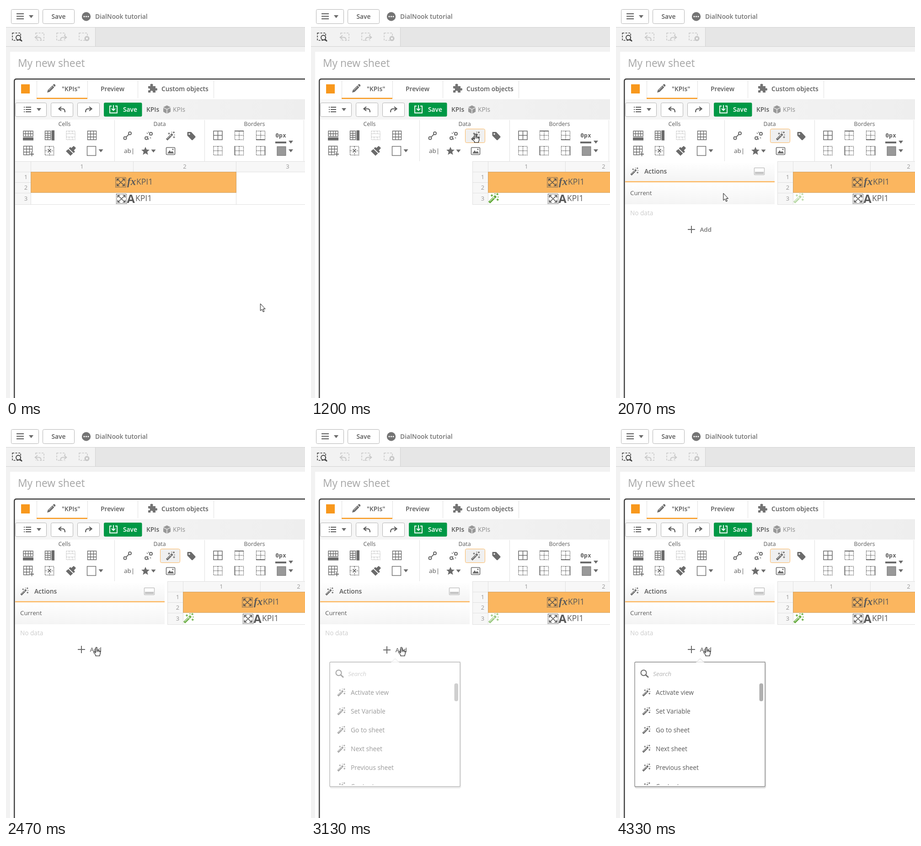
An HTML page for the animation above (4390 ms loop, 654 by 856 pixels).

```html
<!DOCTYPE html>
<html lang="en">
<head>
<meta charset="utf-8">
<title>Sheet editor</title>
<style>
html, body { margin: 0; width: 100%; height: 100%; overflow: hidden; background: #fff; }
svg { display: block; width: 654px; height: 856px; color: #6b6b6b; font: 13.8px "Open Sans", "Noto Sans", sans-serif; }
text { fill: #595959; }
.b { font-weight: 600; }
.mid { text-anchor: middle; }
.dim { fill: #8c8c8c; }
.num text { fill: #959595; font-size: 13px; text-anchor: middle; }
.btn { fill: #fff; stroke: #b3b3b3; }
.line { fill: none; stroke: currentColor; }
.rule { fill: none; stroke: #e0e0e0; }
.dots { fill: none; stroke: currentColor; stroke-dasharray: 2 1.4; }
.pale { color: #c9c9c9; }

.t { animation: 4390ms infinite both; }
.move { animation-name: move; }
.arrow { animation-name: arrow; animation-timing-function: step-end; }
.hand { animation-name: hand; animation-timing-function: step-end; }
.before { animation-name: before; animation-timing-function: step-end; }
.after { animation-name: after; animation-timing-function: step-end; }
.panel { animation-name: panel; animation-timing-function: linear; }
.add { animation-name: add; animation-timing-function: step-end; }
.menu { animation-name: menu; animation-timing-function: linear; }
.pulse { animation-name: pulse; animation-timing-function: ease-in-out; color: #55a32a; }

@keyframes move {
  0% { transform: translate(556.5px, 650px); animation-timing-function: steps(8, end); }
  12.03% { transform: translate(381px, 301px); animation-timing-function: step-end; }
  13.62% { transform: translate(359px, 279.5px); animation-timing-function: step-end; }
  37.9% { transform: translate(359px, 279.5px); animation-timing-function: steps(8, end); }
  50.05% { transform: translate(193.5px, 452px); animation-timing-function: step-end; }
  51.59%, 100% { transform: translate(197.5px, 483.5px); }
}
@keyframes arrow {
  0%, 40.89% { opacity: 1; }
  13.62%, 51.59%, 100% { opacity: 0; }
}
@keyframes hand {
  0%, 40.89% { opacity: 0; }
  13.62%, 51.59%, 100% { opacity: 1; }
}
@keyframes before { 0% { opacity: 1; } 27.29%, 100% { opacity: 0; } }
@keyframes after { 0% { opacity: 0; } 27.29%, 100% { opacity: 1; } }
@keyframes panel { 0%, 30.25% { opacity: 0; } 34.85%, 100% { opacity: 1; } }
@keyframes add {
  0%, 74.37%, 100% { transform: none; }
  66.74% { transform: translate(1px, 1px); }
}
@keyframes menu { 0%, 66.74% { opacity: 0; } 74.37%, 100% { opacity: 1; } }
@keyframes pulse {
  0%, 27.33%, 61.5%, 95.67% { opacity: 1; }
  44.42%, 78.59% { opacity: .4; }
  100% { opacity: .93; }
}
</style>
</head>
<body>
<svg viewBox="0 0 654 856">
<defs>
  <linearGradient id="shade" x2="0" y2="1"><stop offset="0" stop-color="#fff"/><stop offset="1" stop-color="#f4f4f4"/></linearGradient>
  <linearGradient id="bar" x2="1" y2="0"><stop offset="0" stop-color="#f7f7f7"/><stop offset="1" stop-color="#eee"/></linearGradient>
  <clipPath id="list"><path d="M42 560H312V784H42Z"/></clipPath>
  <path id="down" d="M-5-3H5L0 3.5Z" fill="currentColor"/>
  <g id="wand">
    <path d="M-8 8L4.5-4.5" stroke="currentColor" stroke-width="4.6"/>
    <path d="M-.6-2.4L2.4.6M1.8-2.8L-7 6" stroke="#fff" stroke-width="1"/>
    <path d="M-5-5.5h4M-3-7.5v4M5.5-8h4M7.500-10v4M6 2.500h4M8 .5v4M2-8.500h2M8-2.500h2" stroke="currentColor" stroke-width="1.5"/>
  </g>
  <g id="table"><path class="line" stroke-width="1.4" d="M-9.500-9.500H9.500V9.500H-9.500ZM-9.500-3H9.500M-9.500 3.500H9.500M-3-9.500V9.500M3.500-9.500V9.500"/></g>
  <g id="dotted"><path class="dots" stroke-width="1.4" d="M-9.500-9.500H9.500V9.500H-9.500ZM-9.500 0H9.500M0-9.500V9.500"/></g>
  <path id="dashbox" class="line" stroke-width="1.6" stroke-dasharray="4 2.500" d="M-10-8H8V8H-10Z"/>
  <path id="back" fill="none" stroke="currentColor" d="M-1-6L-6.500-1.500-1 3M-6-1.500H2Q7-1.500 7 6"/>
  <g id="expand">
    <path class="line" stroke-dasharray="1.5 1.3" stroke-width="1.5" d="M-11-10.500H11V10.500H-11Z"/>
    <path class="line" stroke-width="1.6" d="M-7.500-7L7.500 7M7.500-7L-7.500 7M-8-2.500V-7.500H-3M8-2.500V-7.500H3M-8 2.500V7.500H-3M8 2.500V7.500H3"/>
  </g>
  <g id="cells" color="#4d4d4d">
    <use href="#expand" x="251" y="385"/>
    <text x="265" y="391" font-size="23" font-family="Liberation Serif, serif" font-weight="700" font-style="italic">fx</text>
    <text x="285" y="390" font-size="17.500">KPI1</text>
    <use href="#expand" x="252.500" y="421"/>
    <text x="264.500" y="430" font-size="25" font-weight="700">A</text>
    <text x="283" y="426" font-size="17.500">KPI1</text>
  </g>
</defs>

<!-- app header -->
<path fill="#f2f2f2" d="M0 46H654V856H0Z"/>
<path fill="#e6e6e6" d="M196 47H654V88H196Z"/>
<path fill="#fff" d="M0 0H654V46H0ZM9 100H654V856H9Z"/>
<path fill="none" stroke="#d2d2d2" d="M0 46.500H654M0 88.500H654M195.500 47V88"/>
<rect class="btn" x="11.500" y="7.500" width="60" height="31" rx="3"/>
<path stroke="#595959" stroke-width="2" d="M23 17H39M23 22.500H39M23 28H39"/>
<use href="#down" x="55" y="23"/>
<rect class="btn" x="80.500" y="7.500" width="69" height="31" rx="3"/>
<text class="b mid" x="115" y="28">Save</text>
<circle cx="175.500" cy="23" r="9.700" fill="#737373"/>
<g fill="#fff"><circle cx="171" cy="23" r="1.600"/><circle cx="175.500" cy="23" r="1.600"/><circle cx="180" cy="23" r="1.600"/></g>
<text class="b" x="195" y="28" style="fill:#737373">DialNook tutorial</text>
<g color="#404040">
  <use href="#dashbox" x="24" y="67"/>
  <circle cx="27" cy="69" r="5" fill="#f2f2f2" stroke="#404040" stroke-width="1.800"/>
  <path stroke="#404040" stroke-width="2.500" d="M30.500 72.500L35 77"/>
</g>
<g class="pale">
  <use href="#dashbox" x="75" y="67"/><use href="#dashbox" x="121" y="67"/><use href="#dashbox" x="170" y="67"/>
  <path fill="#f2f2f2" d="M62 64h13v10H62ZM122 64h12v11h-12Z"/>
  <use href="#back" x="70" y="70" stroke-width="1.800"/>
  <use href="#back" transform="translate(126 70) scale(-1 1)" stroke-width="1.800"/>
  <circle cx="177" cy="71" r="5.500" fill="#c6c6c6"/>
  <path stroke="#fff" stroke-width="1.400" d="M175 69l4 4M179 69l-4 4"/>
</g>
<text x="26" y="133" font-size="22.800" style="fill:#a6a6a6">My new sheet</text>

<!-- tabs -->
<path fill="#fff" stroke="#404040" stroke-width="2.500" d="M18.200 860V164Q18.200 159.500 23 159.500H660V860Z"/>
<path class="rule" d="M67.500 162V201M178.500 162V201M288.500 162V201M454.500 162V201"/>
<path fill="#f8981d" d="M33 171H52V191H33ZM67 200.500H178V203H67Z"/>
<g transform="translate(98.500 180)" fill="#6b6b6b">
  <path d="M-8.500 9L-7 3.500 3-6.500 7-2.500-3 7.500ZM4-7.500L6-9.500Q7-10 8-9L9.500-7.500Q10-6.500 9.500-5.500L8-3.500Z"/>
  <path d="M-5 4L3-4" stroke="#fff"/>
</g>
<text class="b" x="122" y="185.500">"KPIs"</text>
<text class="b mid" x="233" y="185.500">Preview</text>
<path fill="#737373" d="M311 175h5q-2-5 2.500-5t2.500 5h6v5q4-2 4 2t-4 2v5h-6q1-4-2.500-4t-2 4h-5.500v-5q4 1 4-2t-4-2Z"/>
<text class="b" x="340" y="185.500">Custom objects</text>

<!-- action bar -->
<path fill="url(#bar)" d="M20 203.500H654V248H20Z"/>
<rect class="btn" x="20.500" y="211.500" width="68" height="30" rx="3"/>
<rect class="btn" x="98.500" y="211.500" width="48" height="30" rx="3"/>
<rect class="btn" x="156.500" y="211.500" width="48" height="30" rx="3"/>
<path fill="none" stroke="#595959" stroke-width="2" d="M43 221H55M43 226H55M43 231H55M39 221h2M39 226h2M39 231h2"/>
<use href="#down" x="72" y="226"/>
<g color="#595959" stroke-width="2.200"><use href="#back" x="122" y="226"/><use href="#back" transform="translate(181 226) scale(-1 1)"/></g>
<rect x="214" y="211" width="83.500" height="30.500" rx="3" fill="#009845"/>
<path fill="none" stroke="#fff" stroke-width="1.800" d="M231 218.500H227V233.500H243V218.500H239M235 216.500V227M231 224L235 228 239 224"/>
<text class="b" x="256" y="231" style="fill:#fff">Save</text>
<text class="b" x="307" y="231">KPIs</text>
<path fill="#999" d="M352 217L360 221 352 225 344 221ZM344 222.500L351.300 226V235L344 231ZM360 222.500L352.700 226V235L360 231Z"/>
<text x="365" y="231" class="dim">KPIs</text>

<!-- ribbon -->
<path fill="#fff" d="M20 248H654V339H20Z"/>
<path class="rule" d="M237.500 249V339M434.500 249V339M651.500 249V339"/>
<g class="mid" font-size="12.400"><text x="128" y="262">Cells</text><text x="336" y="262">Data</text><text x="543.500" y="262">Borders</text></g>
<path class="line" stroke-width="1.400" d="M38 273H59V285H38ZM38 279H59M43 273V285M48.500 273V285M54 273V285"/>
<path fill="currentColor" d="M37 287H60V293.500H37ZM99.500 271.500H106V293.500H99.500Z"/>
<path class="line" stroke-width="1.400" d="M85.500 273H97.500V292H85.500ZM85.500 278H97.500M85.500 282.500H97.500M85.500 287H97.500M91.500 273V292"/>
<g class="pale"><path class="dots" stroke-width="1.400" d="M132 273H151V279H132ZM132 286H151V292H132ZM138 273V279M145 273V279M138 286V292M145 286V292"/><path class="line" d="M132 279V286M151 279V286"/></g>
<use href="#table" x="188" y="282.500"/>
<use href="#table" x="48" y="315.500"/>
<path fill="#fff" d="M52 319H62V329H52Z"/><path class="line" stroke-width="1.800" d="M52.500 323.500H61M56.500 319V328"/>
<path class="dots" stroke-width="1.600" d="M85.500 306.500H104.500V325.500H85.500ZM95 306V311M95 321V326M85 316H90M100 316H105"/>
<path class="line" stroke-width="1.800" d="M91.500 312.500L98.500 319.500M98.500 312.500L91.500 319.500"/>
<path fill="currentColor" d="M143 310L148 305.500 153 310 148.500 315.500 151 318 148 321 137.500 311 140.500 308ZM136.500 312.500L146.500 322 141 327 131 317Z"/>
<rect x="177.500" y="306.500" width="19" height="20" fill="#fff" stroke="#6b6b6b" stroke-width="1.400"/>
<use href="#down" x="207.500" y="316"/>

<g class="line" stroke-width="2"><circle cx="260.500" cy="288.500" r="3"/><circle cx="271" cy="278" r="3"/><path d="M263 286L268.500 280.500"/>
<circle cx="307" cy="288.500" r="3"/><circle cx="317" cy="279" r="3"/><path d="M309.500 286l1.500-1.500M313.500 282l1.500-1.500M308 277l2 2M312 274.500v2.500M315 287l2 2M311.500 289v3" stroke-width="1.500"/></g>
<g class="t after"><rect x="337.500" y="268.500" width="43" height="30" rx="3" fill="#f0f0f0" stroke="#fbb65f"/></g>
<use href="#wand" x="359.500" y="284"/>
<path fill="currentColor" d="M397 275H405L414 284.500Q415 286 414 287L408.500 292.500Q407 293.500 406 292.500L396.500 283V276Z"/><circle cx="401" cy="279.500" r="1.700" fill="#fff"/>
<text x="258" y="321" font-size="13.500">ab|</text>
<path fill="currentColor" d="M305 307.500L307.600 313.500 314 314 309 318.300 310.600 325 305 321.500 299.400 325 301 318.300 296 314 302.400 313.500Z"/>
<use href="#down" x="322.500" y="316.500"/>
<rect x="350.500" y="309" width="19" height="15.500" rx="1.500" class="line" stroke-width="1.600"/>
<path fill="currentColor" d="M353 322L358 315 361 319 363.500 316.500 367.500 322Z"/><circle cx="365" cy="313" r="1.600" fill="currentColor"/>

<path class="line" stroke-width="1.500" d="M454 273H473V292H454ZM454 282.500H473M463.500 273V292"/>
<use href="#dotted" x="510" y="282.500"/><use href="#dotted" x="557" y="282.500"/>
<use href="#dotted" x="463.500" y="316"/><use href="#dotted" x="510" y="316"/><use href="#dotted" x="557" y="316"/>
<path class="line" stroke-width="1.800" d="M500 273H520M547 292H567M500.500 306V326M566.500 306V326"/>
<text class="mid b" x="601" y="287" font-size="13" font-family="DejaVu Sans Mono, monospace">0px</text>
<path fill="currentColor" d="M589 296H613V300H589Z"/>
<use href="#down" x="623" y="297"/><use href="#down" x="623" y="316"/>
<rect x="593" y="307" width="19" height="19.500" fill="#999" stroke="#6b6b6b"/>

<!-- wide grid -->
<g class="t before">
  <path fill="#f7f7f7" d="M20 340H654V362H20ZM20 362H54V434H20Z"/>
  <path class="rule" d="M20 339.500H654M20 362.500H654M20 385.500H54M20 408.500H54M20 433.500H654M54.500 340V434M278.500 340V362M503.500 340V434"/>
  <rect x="54.500" y="362.500" width="449" height="45" fill="#fbb65f" stroke="#a8772f" stroke-dasharray="1 1"/>
  <g class="num"><text x="166" y="355">1</text><text x="391" y="355">2</text><text x="616" y="355">3</text><text x="43.500" y="378">1</text><text x="43.500" y="401">2</text><text x="43.500" y="425">3</text></g>
  <use href="#cells"/>
</g>

<!-- narrow grid -->
<g class="t after">
  <path fill="#f7f7f7" d="M353 340H654V362H353ZM353 362H387V434H353Z"/>
  <path class="rule" d="M353 339.500H654M353 362.500H654M353 385.500H387M353 408.500H387M353 433.500H654M353.500 340V434M387.500 340V434M556.500 340V362"/>
  <rect x="387.500" y="362.500" width="338" height="45" fill="#fbb65f" stroke="#a8772f" stroke-dasharray="1 1"/>
  <g class="num"><text x="471" y="355">1</text><text x="640" y="355">2</text><text x="375.500" y="378">1</text><text x="375.500" y="401">2</text><text x="375.500" y="425">3</text></g>
  <use href="#cells" x="277"/>
  <g class="t pulse"><use href="#wand" transform="translate(399 420) scale(1.150)"/></g>
</g>

<!-- actions panel -->
<g class="t panel">
  <path fill="url(#shade)" d="M20 340H347V382H20Z"/>
  <path fill="url(#shade)" d="M20 385H347V433H20Z"/>
  <path fill="#fbb65f" d="M20 382.500H347V385H20Z"/>
  <use href="#wand" transform="translate(40 361.500) scale(.9)"/>
  <text class="b" x="62" y="366">Actions</text>
  <rect x="302.500" y="353.500" width="22" height="15" rx="1" fill="#fff" stroke="#c2c2c2" stroke-width="1.500"/>
  <path fill="#c6c6c6" d="M304 362H323V367H304Z"/>
  <text x="31" y="413" font-size="13.300">Current</text>
  <text x="31" y="457" font-size="13.600" style="fill:#ccc">No data</text>
  <g class="t add">
    <path stroke="#6b6b6b" stroke-width="2" d="M157 488H173M165 480V496"/>
    <text class="b" x="183.500" y="493" font-size="13.400" style="fill:#737373">Add</text>
  </g>
</g>

<!-- action menu -->
<g class="t menu">
  <rect x="42" y="517" width="285" height="273" rx="3" fill="none" stroke="#000" stroke-opacity=".12" stroke-width="3"/>
  <path fill="#fff" stroke="#858585" stroke-width="1.300" d="M43 515.500H326Q326 515.500 326 517.500V785.500Q326 787.500 324 787.500H43Q41 787.500 41 785.500V517.500Q41 515.500 43 515.500Z"/>
  <path fill="#fff" stroke="#ccc" d="M176 515.500L184 508 192 515.500"/>
  <path fill="#fff" d="M175 515.700H193V518H175Z"/>
  <g class="line" stroke-width="2"><circle cx="60.500" cy="539" r="6"/><path stroke-width="2.600" d="M65 543.500L71 549"/></g>
  <text x="81" y="546" font-style="italic" font-size="13.500" style="fill:#b3b3b3">Search</text>
  <rect x="313.500" y="562" width="8.500" height="39" rx="4" fill="#b0b0b0"/>
  <g clip-path="url(#list)" id="items"></g>
</g>

<!-- pointer -->
<g class="t move" stroke="#000" fill="#fff" stroke-linejoin="round">
  <path class="t arrow" d="M0 0V15.500L3.500 12.300 6 18 8.300 17 6 11.500H10.500Z"/>
  <g class="t hand" stroke-width="1.100">
    <path d="M-1.500 11V1.500Q-1.500 0 0 0T1.500 1.500V7Q1.500 5.500 3 5.700T4.300 7.200Q4.600 6 5.800 6.400T7 7.800Q8.600 7.300 8.700 9V13Q8.700 15 7.500 16.500V18.500H-1.500V16.500L-5.500 11.500Q-6.300 10 -5 9.400Q-3.700 9 -1.500 12Z"/>
    <path fill="none" d="M1.500 7V10M4.300 7.500V10M7 8V10"/>
  </g>
</g>
</svg>
<script>
const labels = ["Activate view", "Set Variable", "Go to sheet", "Next sheet", "Previous sheet", "Content"];
document.getElementById("items").innerHTML = labels.map((label, i) => {
  const y = 582 + i * 41;
  return `<use href="#wand" transform="translate(66 ${y}) scale(.9)"/><text x="87" y="${y + 5}">${label}</text>`;
}).join("");
</script>
</body>
</html>
```
